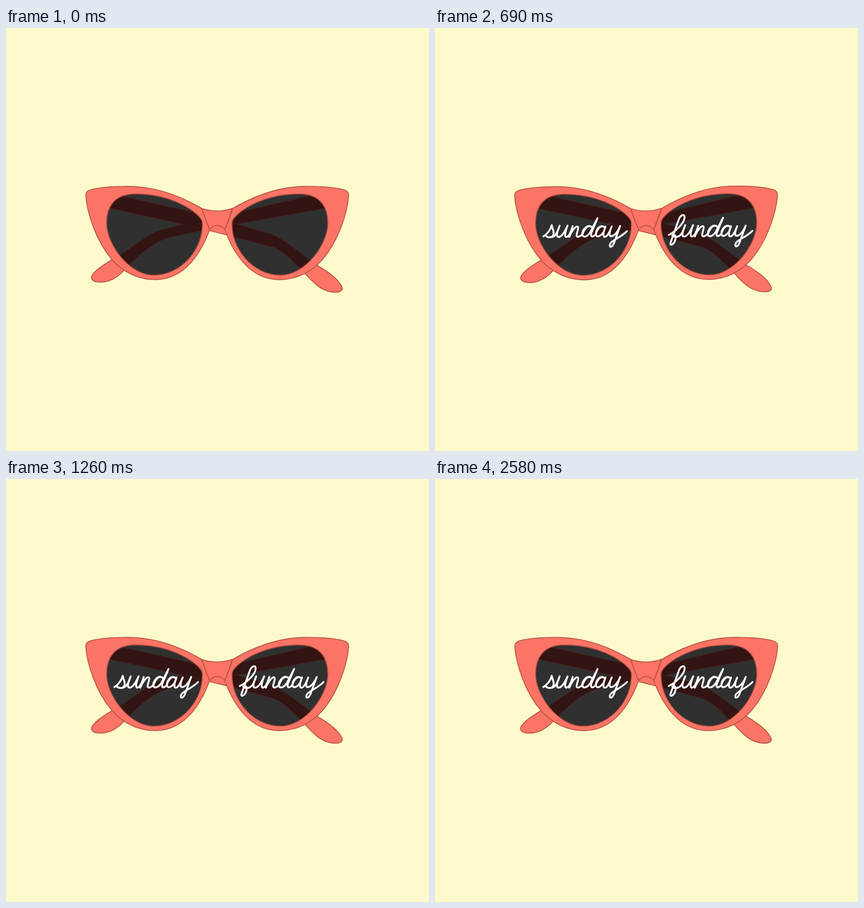
Animation of 748 by 748 pixels, one loop 2.61 s. Source, as an HTML page:

```html
<!DOCTYPE html>
<html lang="en">
<head>
<meta charset="utf-8">
<title>Sunglasses</title>
<style>
  html, body { margin: 0; width: 100%; height: 100%; overflow: hidden; background: #fcfacb; }
  svg { display: block; width: 100%; height: 100%; }
  .coral { fill: #fb7465; stroke: #b95244; stroke-width: 1.5; stroke-linejoin: round; }
  .lens { fill: #303030; }
  .edge { fill: none; stroke: #a64a3e; stroke-width: 1.5; }
  .shade { fill: #321412; stroke: #421b18; stroke-width: 1.2; }
  .ink { fill: none; stroke: #fff; stroke-width: 3.2; stroke-linecap: round; stroke-linejoin: round; }
</style>
</head>
<body>
<svg viewBox="0 0 748 748" role="img" aria-label="sunday funday">
  <defs>
    <path id="rim" d="M346 319 C300 292 255 280 215 280 C190 280 165 282 150 286 Q141 288 141 296
      C143 325 158 375 187 409 C206 431 233 445 264 445 C312 445 342 405 360 357 Q352 338 346 319 Z"/>
    <path id="glass" d="M347 343 C345 330 300 294 230 293.5 C190 293 178 318 178 345
      C178 382 217 437 262 437 C310 437 350 390 347 343 Z"/>
    <g id="rims">
      <use href="#rim"/>
      <use href="#rim" transform="translate(747) scale(-1 1)"/>
    </g>
    <g id="lenses">
      <use href="#glass"/>
      <use href="#glass" transform="translate(747) scale(-1 1)"/>
    </g>
    <g id="arms">
      <path d="M580 287 L540 296 L403 328 L315 347 L268 359 C240 372 215 395 187 410
        C165 423 151 435 151 442 C153 451 170 451 182 447 C194 443 203 435 209 428
        C228 409 250 384 285 371 L347 358 L405 347 L580 316 Z"/>
      <path d="M167 289 L345 329 L401 345 L460 362 C490 370 520 398 549 419
        C570 431 591 446 595 461 C593 470 573 469 557 460 C545 453 535 441 527 432
        C508 413 491 393 470 387 L391 366 L315 347 L167 315 Z"/>
    </g>
    <clipPath id="view">
      <use href="#glass"/>
      <use href="#glass" transform="translate(747) scale(-1 1)"/>
    </clipPath>
  </defs>
  <g id="glasses">
    <use href="#arms" class="coral"/>
    <path class="coral" d="M346 319 Q373 328 400 319 Q395 338 387 356 Q373 342 360 356 Q352 338 346 319 Z"/>
    <use href="#rims" class="coral"/>
    <use href="#lenses" class="lens"/>
    <g clip-path="url(#view)"><use href="#arms" class="shade"/></g>
    <use href="#lenses" class="edge"/>
    <g id="words" class="ink"></g>
  </g>
</svg>
<script>
const LOOP = 2610, STEP = 30, WRITE = 450;
// time in ms, tilt in degrees
const TILT = [[0, 0], [450, 0], [540, -3], [615, 2], [690, -0.2], [720, 0], [LOOP, 0]];

const S = "M193 368 C200 364 206 356 208 348 C209 355 214 361 210 367 C207 371 199 370 197 366";
const F = "M415 366 C424 362 443 346 443 335 C443 328 436 331 433 338 L419 377 " +
  "C414 388 425 384 427 372 C428 366 424 365 421 367 C424 370 428 370 431 369";
const UNDAY = "M209 369 C216 367 219 357 222 349 C219 356 214 369 220 369 C226 369 232 358 236 349 " +
  "C233 356 229 369 234 369 C239 368 243 357 245 350 L239 369 " +
  "C243 358 251 349 254 351 C257 353 251 363 252 367 C253 371 259 368 263 363 " +
  "C266 354 273 346 279 352 C271 345 262 357 262 364 C262 371 270 370 276 361 " +
  "L289 336 L278 362 C276 369 280 371 286 364 " +
  "C289 354 296 347 301 352 C293 346 286 357 286 364 C286 371 294 369 300 360 " +
  "L303 351 C300 358 297 369 302 369 C307 369 311 358 314 351 " +
  "C311 357 308 368 313 368 C319 368 326 358 329 350 " +
  "L318 380 C315 388 309 389 311 382 C313 375 330 371 341 359";

const glasses = document.getElementById("glasses");
const words = document.getElementById("words");

function stroke(d, dx) {
  const el = document.createElementNS("http://www.w3.org/2000/svg", "path");
  el.setAttribute("d", d);
  el.setAttribute("transform", `translate(${dx})`);
  words.append(el);
  return { el, len: el.getTotalLength() };
}

const sunday = [stroke(S, -1.5), stroke(UNDAY, -1.5)];
const funday = [stroke(F, -1.5), stroke(UNDAY, 220.5)];

function reveal(word, p) {
  let left = p * word.reduce((sum, s) => sum + s.len, 0);
  for (const { el, len } of word) {
    const shown = Math.max(0, Math.min(len, left));
    el.style.visibility = shown > 0 ? "visible" : "hidden";
    el.style.strokeDasharray = shown < len ? `${shown} ${len + 10}` : "none";
    left -= len;
  }
}

function tiltAt(t) {
  const i = TILT.findIndex(k => k[0] > t);
  const [t0, a] = TILT[i - 1], [t1, b] = TILT[i];
  return a + (b - a) * (1 - Math.cos(Math.PI * (t - t0) / (t1 - t0))) / 2;
}

function draw(t) {
  const p = Math.min(1, t / WRITE);
  reveal(sunday, p);
  reveal(funday, p);
  glasses.setAttribute("transform", `rotate(${tiltAt(t)} 374 374)`);
}

const start = performance.now();
function tick() {
  const t = (performance.now() - start) % LOOP;
  draw(Math.floor(t / STEP) * STEP);
  requestAnimationFrame(tick);
}
draw(0);
requestAnimationFrame(tick);
</script>
</body>
</html>
```
